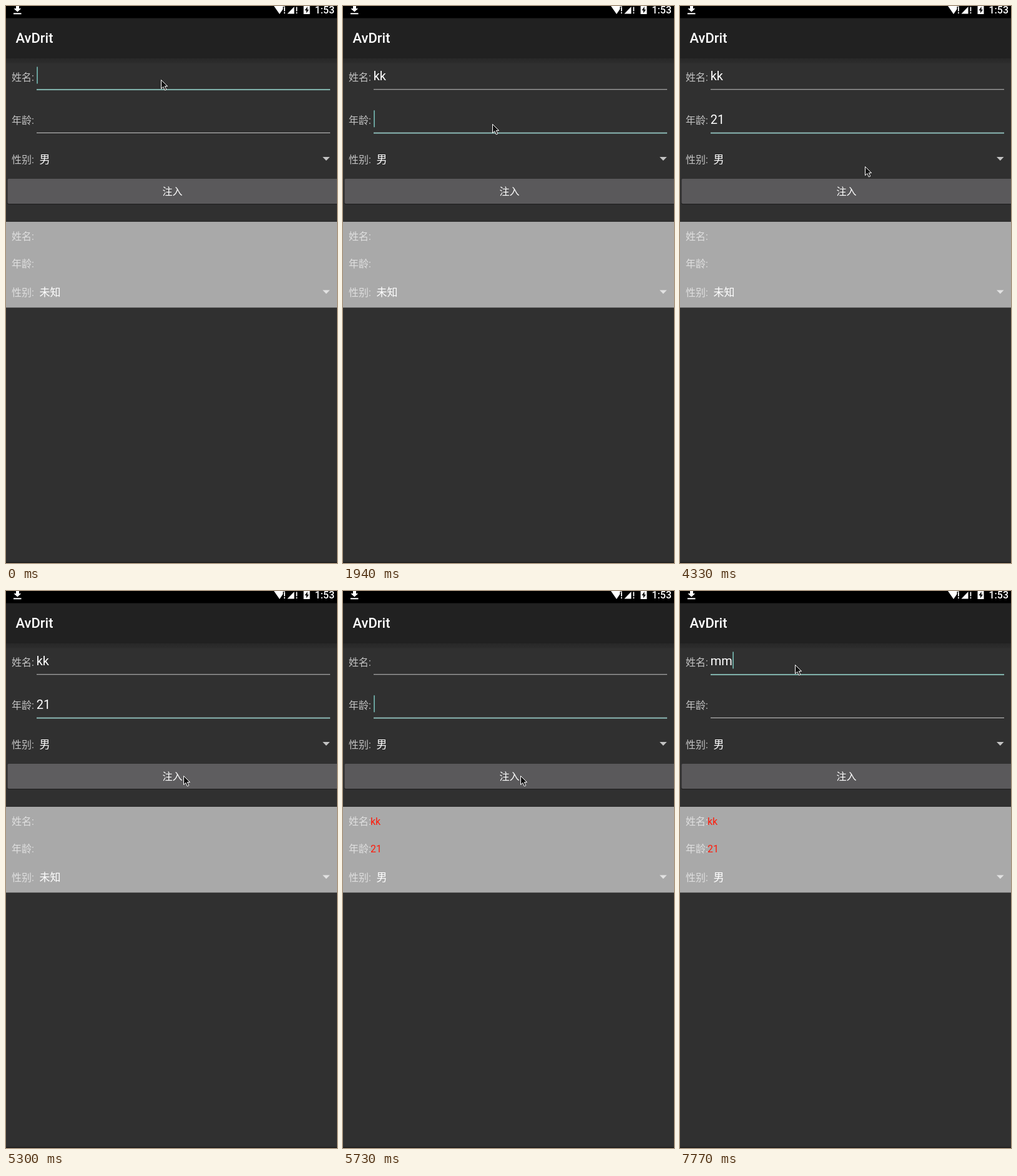
Write an HTML page that moves like this. It is 530 px wide and 893 px high and loops after 8 s.

```html
<!DOCTYPE html>
<html lang="zh-CN">
<head>
<meta charset="utf-8">
<title>Form demo</title>
<style>
  html, body { margin: 0; width: 100%; height: 100%; overflow: hidden; background: #303030; }
  svg { display: block; width: 530px; height: 893px; }
  text { font-family: Roboto, "Noto Sans CJK SC", "Noto Sans CJK", sans-serif; font-size: 16px; fill: #fff; }
  .label { fill: #c3c3c3; }
  .panel .label { fill: #dfdfdf; }
  .choice { font-size: 17px; }
  .entry { font-size: 20px; }
  .result { fill: #ff1c0c; }
  .medium { font-weight: 500; }
  .title { font-size: 22px; }
</style>
</head>
<body>
<svg viewBox="0 0 530 893">
  <defs>
    <linearGradient id="shade" x2="0" y2="1">
      <stop stop-color="#282828"/>
      <stop offset="1" stop-color="#2d2d2d"/>
    </linearGradient>
  </defs>
  <rect width="530" height="893" fill="#303030"/>
  <rect y="891.5" width="530" height="1.5" fill="#1c1c1c"/>
  <rect y="84" width="530" height="8" fill="url(#shade)"/>
  <rect y="19" width="530" height="65" fill="#212121"/>
  <rect width="530" height="19.5" fill="#000"/>

  <g fill="#fff">
    <path d="M16 0h5v4h3.2L18.4 9.6 12.4 4H16zM12 11.3h12.5v2H12z"/>
    <path d="M429 0H447L438 13z"/>
    <path d="M443.5 1h4.5v12h-4.5z" fill="#000"/>
    <path d="M445 1.5h1.8v7H445zM445 10h1.8v2H445z"/>
    <path d="M450.5 12.5 461.5 1v11.5zM464.5 1.5h1.8v7h-1.8zM464.5 10h1.8v2h-1.8z"/>
    <path d="M476.5 0h10v13h-10z"/>
    <path d="M482.6 1 478.5 7h2.4v4.5L485 5.7h-2.4z" fill="#000"/>
  </g>
  <text class="medium" x="494.5" y="11.5">1:53</text>
  <text class="medium title" x="15.5" y="59">AvDrit</text>

  <text class="label" x="9" y="120">姓名:</text>
  <text class="label" x="9" y="189">年龄:</text>
  <text class="label" x="9" y="252">性别:</text>
  <text class="choice" x="53.5" y="251.5">男</text>
  <path d="M507 242h11.5l-5.75 6z" fill="#c3c3c3"/>

  <rect x="2" y="278" width="530" height="40.3" rx="2" fill="#222"/>
  <rect id="button" x="2.5" y="277" width="530" height="40" rx="2"/>
  <text x="250.5" y="303">注入</text>

  <g class="panel">
    <rect y="346" width="530" height="137.5" fill="#a9a9a9"/>
    <text class="label" x="9" y="375">姓名:</text>
    <text class="label" x="9" y="419">年龄:</text>
    <text class="label" x="9" y="465">性别:</text>
    <text class="result" id="nameResult" x="44" y="375"></text>
    <text class="result" id="ageResult" x="44" y="419"></text>
    <text class="choice" id="genderResult" x="53.5" y="464.5"></text>
    <path d="M507 455.5h11.5l-5.75 6z" fill="#e2e2e2"/>
  </g>

  <g id="fields"></g>
  <path id="pointer" d="M.5 .5V14.6L3.8 11.5 6.3 17 8.8 15.9 6.4 10.6H10.6Z"
        fill="#111" stroke="#fff" stroke-width="1"/>
</svg>
<script>
const LOOP = 8000;
const byId = id => document.getElementById(id);

// Step tables: [start time, value]
const nameText = [[0, ''], [270, 'k'], [540, 'kk'], [5470, ''], [7680, 'm'], [7770, 'mm']];
const ageText = [[0, ''], [2480, '2'], [2830, '21'], [5470, '']];
const nameCaret = [[0, 1], [1070, 0], [1500, 1], [1590, 0], [6700, 1], [7230, 0], [7680, 1]];
const ageCaret = [[0, 0], [1590, 1], [2120, 0], [2480, 1], [3360, 0], [3890, 1], [4330, 0],
  [4860, 1], [5300, 0], [5470, 1], [5910, 0], [6430, 1], [6700, 0]];
const ageFocus = [[0, 0], [1590, .3], [1680, .6], [1760, .85], [1940, 1],
  [6700, .7], [6790, .4], [6880, .15], [7050, 0]];
const buttonFill = [[0, '#5a595b'], [5300, '#5e5d5f'], [5390, '#656466'],
  [5470, '#6b6a6c'], [5560, '#626163'], [5730, '#5a595b']];
const submitted = [[0, false], [5470, true]];

// Pointer moves: [first step, last step, steps, x, y]
const home = [248, 118];
const moves = [
  [890, 1160, 4, 240, 186], [1330, 1330, 1, 239, 189], [3190, 3190, 1, 242, 208],
  [3280, 3890, 8, 300, 305], [4150, 4330, 3, 296, 257], [4420, 4590, 3, 306, 245],
  [4770, 5040, 4, 284, 296], [6090, 6430, 5, 184, 118]
];

const at = (table, time) => table.findLast(([start]) => start <= time)[1];

function pointerAt(time) {
  let [x, y] = home;
  for (const [start, end, steps, toX, toY] of moves) {
    if (time < start) break;
    const step = end > start ? Math.floor((time - start) / (end - start) * (steps - 1) + .05) : 0;
    const part = Math.min(1, (step + 1) / steps);
    x += (toX - x) * part;
    y += (toY - y) * part;
  }
  return [Math.round(x), Math.round(y)];
}

function add(tag, attributes) {
  const node = document.createElementNS('http://www.w3.org/2000/svg', tag);
  for (const key in attributes) node.setAttribute(key, attributes[key]);
  return byId('fields').appendChild(node);
}

function makeField(baseline, idle, idleHeight, active, activeHeight) {
  const line = { x: 49, y: baseline + 14, width: 470 };
  add('rect', { ...line, height: idleHeight, fill: idle });
  const glow = add('rect', { ...line, height: activeHeight, fill: active });
  const entry = add('text', { class: 'entry', x: 48.7, y: baseline });
  const caret = add('rect', { y: baseline - 21.5, width: 1.7, height: 27, fill: '#74b5ae' });
  return (text, caretOn, focus) => {
    if (entry.textContent !== text) entry.textContent = text;
    caret.setAttribute('x', 49.2 + (text ? entry.getComputedTextLength() : 0));
    caret.setAttribute('opacity', caretOn);
    glow.setAttribute('opacity', focus);
  };
}

const drawName = makeField(119, '#9a9a9a', 1.4, '#7fb0a9', 2.1);
const drawAge = makeField(188.8, '#b4b4b4', 1.2, '#8abcb8', 1.8);

function draw(time) {
  const focus = at(ageFocus, time);
  const done = at(submitted, time);
  drawName(at(nameText, time), at(nameCaret, time), 1 - focus);
  drawAge(at(ageText, time), at(ageCaret, time), focus);
  byId('nameResult').textContent = done ? 'kk' : '';
  byId('ageResult').textContent = done ? '21' : '';
  byId('genderResult').textContent = done ? '男' : '未知';
  byId('button').setAttribute('fill', at(buttonFill, time));
  byId('pointer').setAttribute('transform', `translate(${pointerAt(time)})`);
}

const begin = performance.now();
function tick() {
  draw((performance.now() - begin) % LOOP);
  requestAnimationFrame(tick);
}
tick();
</script>
</body>
</html>
```
